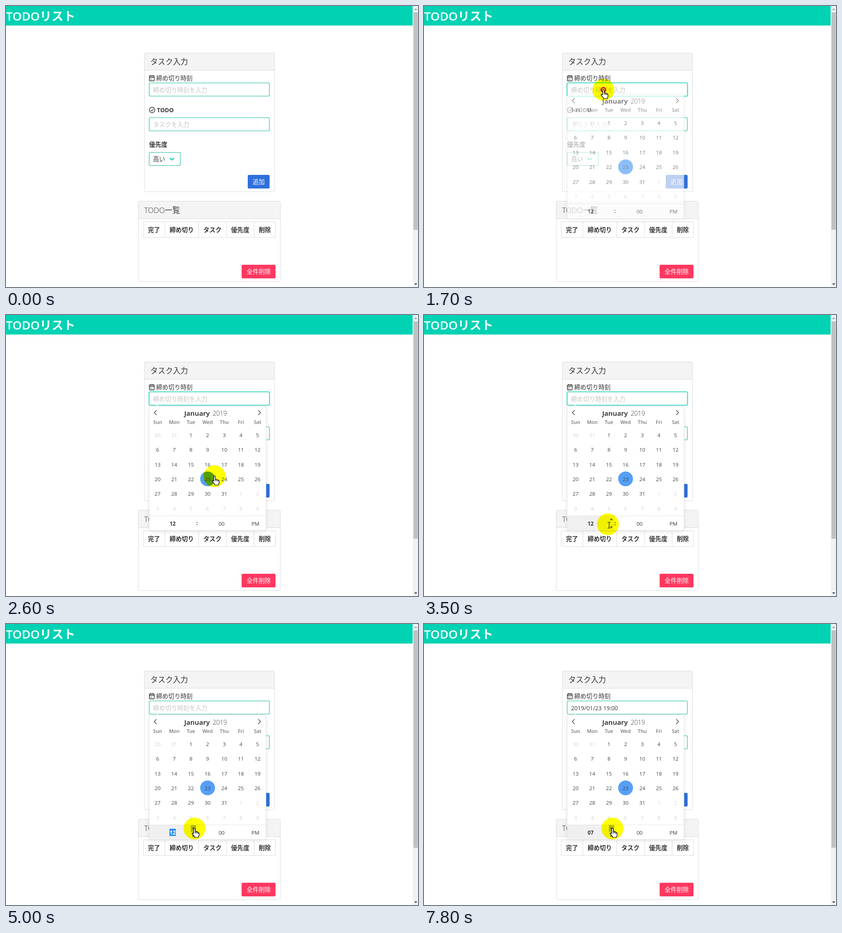
An HTML page for the animation above (8000 ms loop, 905x619 px).

```html
<!DOCTYPE html>
<html lang="ja">
<head>
<meta charset="utf-8">
<title>TODOリスト</title>
<style>
  html, body { margin: 0; width: 100%; height: 100%; overflow: hidden; background: #fff; }
  svg { display: block; width: 905px; height: 619px; }
  text { font: 13.3px "Open Sans", "Noto Sans CJK JP", "Noto Sans CJK", sans-serif; fill: #363636; white-space: pre; }
  .mid { text-anchor: middle; }
  .b { font-weight: 700; }
  .sb { font-weight: 600; }
  .title { font-size: 16.6px; font-weight: 300; }
  .hint { fill: #c6c6c6; font-weight: 300; }
  .white { fill: #fff; }
  .line { fill: none; stroke: #dbdbdb; }
  .field { fill: #fff; stroke: #1fbd9e; stroke-width: 1.1; }
  .icon { fill: none; stroke: #333; stroke-width: 1.4; stroke-linecap: round; stroke-linejoin: round; }
  .day { font-size: 11.4px; fill: #404848; text-anchor: middle; }
  .off { fill: #d3d3d3; }
  .week { font-size: 10.7px; font-weight: 600; fill: #757575; text-anchor: middle; }
  .clock { font-size: 11.5px; text-anchor: middle; }
  .sheet { fill: #fff; stroke: #e6e6e6; filter: drop-shadow(0 2px 5px rgba(0,0,0,.09)); }
  .glow { fill: none; stroke: #00d1b2; stroke-opacity: .25; stroke-width: 2; }
  .halo { fill: #ff0; mix-blend-mode: multiply; }
  .ring { fill: none; stroke: #e5143f; stroke-width: 3; }
  .pointer { fill: #fff; stroke: #000; stroke-width: 1.2; stroke-linejoin: round; }
</style>
</head>
<body>
<svg viewBox="0 0 905 619">
  <rect width="905" height="619" fill="#fff"/>
  <rect width="893.5" height="43" fill="#00d2b3"/>
  <text class="sb white" x="0" y="32" style="font-size:26px">TODO<tspan class="b">リスト</tspan></text>

  <!-- scrollbar -->
  <rect x="893.5" width="11.5" height="619" fill="#f1f1f1"/>
  <rect x="895" y="14" width="9.5" height="479" fill="#c1c1c1"/>
  <path d="M896.5 9h7l-3.5-4z" fill="#a3a3a3"/>
  <path d="M896.5 611h7l-3.5 4z" fill="#505050"/>

  <!-- entry card -->
  <path d="M304 141.5V106q0-2.5 2.5-2.5H587q2.5 0 2.5 2.5v35.5z" fill="#f4f4f4"/>
  <rect class="line" x="304" y="103.5" width="285.5" height="305.5" rx="2.5"/>
  <path class="line" d="M304 141.5h285.5"/>
  <text class="title" x="317" y="129">タスク入力</text>
  <g class="icon">
    <rect x="315" y="154" width="10.5" height="11" rx="1"/>
    <path d="M315 157h10.5M317.8 152.5v2M322.7 152.5v2"/>
    <path d="M317.5 160h5.8M317.5 162.5h5.8" stroke-dasharray=".1 2.8"/>
    <circle cx="321" cy="229" r="6"/>
    <path d="M318.3 229.2l2 2 3.6-3.8"/>
  </g>
  <text x="330" y="163.5">締め切り時刻</text>
  <rect class="field" id="dateBox" x="314.5" y="169.5" width="264" height="29" rx="2.8"/>
  <rect class="glow" id="glow" x="313.2" y="168.2" width="266.6" height="31.6" rx="4"/>
  <text class="hint" id="date" x="323" y="189.5"></text>
  <text class="b" x="331.5" y="233.8" style="font-size:12.8px">TODO</text>
  <rect class="field" x="314.5" y="246" width="264" height="29" rx="2.8"/>
  <text class="hint" x="323" y="266">タスクを入力</text>
  <text class="b" x="314.5" y="310">優先度</text>
  <rect class="field" x="314.5" y="322.5" width="68.5" height="29" rx="2.8"/>
  <text x="323" y="342">高い</text>
  <path d="M360.3 335.3l4 4 4-4" fill="none" stroke="#00d1b2" stroke-width="2.2" stroke-linecap="round"/>
  <rect x="531" y="372" width="48" height="30" rx="2.8" fill="#3070db"/>
  <text class="mid white" x="555" y="392">追加</text>

  <!-- list card -->
  <path d="M290.5 468.5v-36q0-2.5 2.5-2.5h307q2.5 0 2.5 2.5v36z" fill="#f4f4f4"/>
  <rect class="line" x="290.5" y="430" width="312" height="177" rx="2.5"/>
  <path class="line" d="M290.5 468.5h312"/>
  <text class="title" x="303.5" y="456">TODO一覧</text>
  <path class="line" d="M301.5 475.5h290.5v34.5h-290.5zM349 475.5v34.5M423 475.5v34.5M484 475.5v34.5M545 475.5v34.5"/>
  <g class="mid">
    <text class="b" x="325" y="497.5">完了</text>
    <text class="b" x="386" y="497.5">締め切り</text>
    <text class="b" x="453.5" y="497.5">タスク</text>
    <text class="b" x="514.5" y="497.5">優先度</text>
    <text class="b" x="568.5" y="497.5">削除</text>
  </g>
  <rect x="517.5" y="570" width="74.5" height="30" rx="2.8" fill="#ff3860"/>
  <text class="mid white" x="555" y="590">全件削除</text>

  <!-- date picker -->
  <g id="picker">
    <rect class="sheet" x="314.5" y="201" width="256.5" height="274" rx="4"/>
    <path d="M328 202l4.2-4.5 4.2 4.5z" fill="#fff"/>
    <path class="icon" d="M330.5 210l-4.8 5 4.8 5M554.3 210l4.8 5-4.8 5" style="stroke-width:1.1"/>
    <text class="b" x="391.5" y="222" style="font-size:15.2px;font-weight:600;fill:#222">January</text>
    <text x="454" y="222" style="font-size:13.7px;font-weight:300">2019</text>
    <circle cx="442.8" cy="361" r="16.3" fill="#569ff7"/>
    <g id="days"></g>
    <path id="hourBg" d="M315 442h101.5v33H318q-3 0-3-3z" fill="#f0f0f0"/>
    <path d="M314.5 442.3h256.5" stroke="#e6e6e6"/>
    <rect id="mark" x="359" y="451" width="14" height="16" fill="#2f8df0"/>
    <text class="clock b" id="hour" x="366" y="463.5"></text>
    <text class="clock b" x="419.6" y="463">:</text>
    <text class="clock" x="473.5" y="463.5">00</text>
    <text class="clock" x="548" y="463.5">PM</text>
    <g id="spin">
      <rect x="406" y="443" width="11.5" height="31.5" fill="#f0f0f0"/>
      <rect id="spinUp" x="406" y="443" width="11.5" height="15" fill="#b5b5b5"/>
      <path d="M408.3 451.5h6.4l-3.2-3.6zM408.3 465.7h6.4l-3.2 3.6z" fill="#505050"/>
    </g>
  </g>

  <g id="cursor">
    <circle class="halo" r="24"/>
  </g>
  <g id="tip">
    <circle class="ring" id="ring" r="4.8"/>
    <path class="pointer" id="arrow" d="M0 0v15.5l3.6-3.3 2.5 5.6 2.5-1.1-2.5-5.4h4.8z"/>
    <path class="pointer" id="hand" d="M-1.7 11V1a1.7 1.7 0 0 1 3.4 0V7q2.9-.7 3.2.9 2.6-.5 3 1 2.3 0 2.3 2V14.500q0 2-1.500 3.300V19.500H.3V17.800L-4.800 12q-1-2 .9-2.200Q-2.700 9.800-1.700 11ZM1.700 7v4M4.900 8v3.300M7.900 9v2.600"/>
    <path id="beam" d="M-.5-4.500h2l1 1 1-1h2M-.5 8.500h2l1-1 1 1h2M2.500-3.500v11" fill="none" stroke="#222" stroke-width="1.1"/>
  </g>
</svg>
<script>
  const LOOP = 8000, STEP = 100;
  const $ = id => document.getElementById(id);
  const show = (id, on) => { $(id).style.display = on ? '' : 'none'; };
  const pad = n => String(n).padStart(2, '0');

  // [time, x, y] of the pointer
  const path = [
    [100, 558, 277], [800, 394, 184.5], [1900, 394, 184.5], [2500, 459, 337],
    [2600, 458, 355], [3000, 453, 359], [3200, 453, 359], [3500, 404, 461],
    [3900, 405, 469], [4300, 405, 469], [5000, 414, 450.5]
  ];
  const hourPresses = [5900, 6300, 6500, 6700, 7000, 7200, 7600];
  const presses = [1700, 4300, ...hourPresses];

  function addText(cls, x, y, str) {
    const el = document.createElementNS('http://www.w3.org/2000/svg', 'text');
    el.setAttribute('class', cls);
    el.setAttribute('x', x);
    el.setAttribute('y', y);
    el.textContent = str;
    $('days').append(el);
  }

  const colX = c => 333 + c * 36.6;
  'Sun Mon Tue Wed Thu Fri Sat'.split(' ').forEach((d, c) => addText('week', colX(c), 240, d));
  for (let i = 0; i < 42; i++) {
    const date = new Date(2018, 11, 30 + i);
    const inMonth = date.getMonth() === 0;
    const n = date.getDate();
    const cls = !inMonth ? 'day off' : n === 23 ? 'day white' : 'day';
    addText(cls, colX(i % 7), 268.700 + Math.floor(i / 7) * 32.4, n);
  }

  function pointerAt(t) {
    const next = path.findIndex(k => k[0] > t);
    if (next < 0) return path[path.length - 1].slice(1);
    if (next === 0) return path[0].slice(1);
    const [t0, x0, y0] = path[next - 1], [t1, x1, y1] = path[next];
    const u = (t - t0) / (t1 - t0), e = u * u * (3 - 2 * u);
    return [x0 + (x1 - x0) * e, y0 + (y1 - y0) * e];
  }

  function draw(t) {
    const [x, y] = pointerAt(t);
    const at = `translate(${x} ${y})`;
    $('cursor').setAttribute('transform', at);
    $('tip').setAttribute('transform', at);
    show('cursor', t >= 100);
    show('tip', t >= 100);

    const beam = t >= 3500 && t < 4800;
    const arrow = t < 1000 && y > 199;
    show('beam', beam);
    show('arrow', arrow);
    show('hand', !beam && !arrow);
    show('ring', presses.some(p => t >= p && t < p + 200));

    // the picker drops in while fading
    const open = t >= 1700;
    const rest = Math.max(0, 1 - (t - 1700) / 250) ** 3 * 0.33;
    show('picker', open);
    $('picker').setAttribute('opacity', 1 - rest);
    $('picker').setAttribute('transform', `translate(0 ${-20 * rest})`);

    const focused = open && t < 4400;
    show('glow', focused);
    $('dateBox').style.stroke = focused ? '#00c9aa' : '';

    const overHour = t >= 3400;
    show('hourBg', overHour);
    show('spin', overHour);
    show('spinUp', t >= 4800);

    const count = hourPresses.filter(p => t >= p + STEP).length;
    const marked = t >= 4400 && count === 0;
    show('mark', marked);
    $('hour').textContent = pad(count || 12);
    $('hour').style.fill = marked ? '#fff' : '';

    const date = $('date');
    date.textContent = count ? `2019/01/23 ${12 + count}:00` : '締め切り時刻を入力';
    date.setAttribute('class', count ? '' : 'hint');
    date.style.fontSize = count ? '12.7px' : '';
  }

  const start = performance.now();
  function tick() {
    const t = (performance.now() - start) % LOOP;
    draw(Math.floor(t / STEP) * STEP);
    requestAnimationFrame(tick);
  }
  tick();
</script>
</body>
</html>
```
